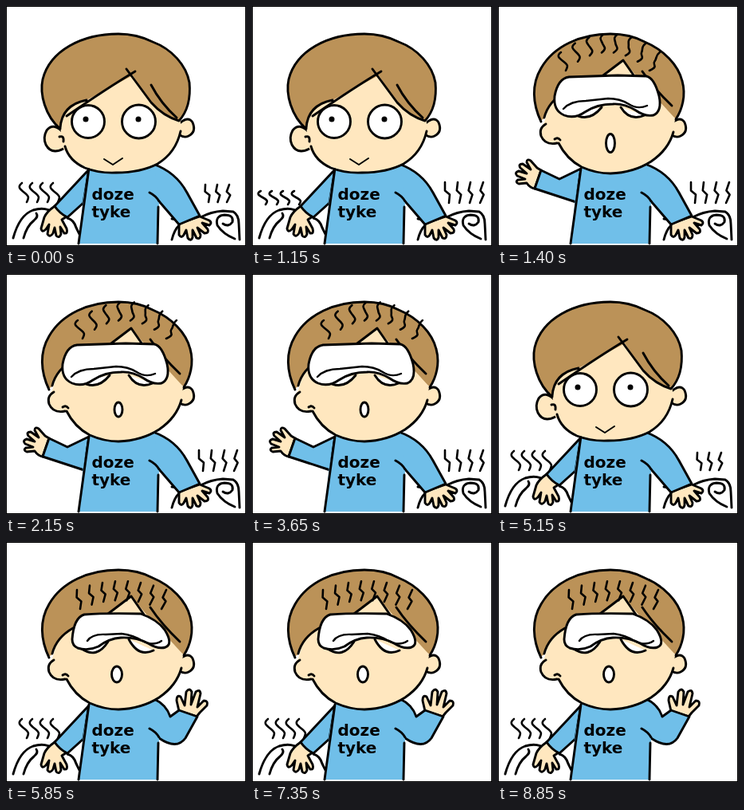
These frames come from a looping animation (301 by 301 pixels, 9.6 s). An HTML page:

```html
<!DOCTYPE html>
<html lang="en">
<head>
<meta charset="utf-8">
<title>Warm compress</title>
<style>
html, body { margin: 0; width: 100%; height: 100%; overflow: hidden; background: #fff; }
svg { display: block; width: 100vw; height: 100vh; }
.ln { fill: none; stroke: #000; stroke-width: 2.9; stroke-linecap: round; stroke-linejoin: round; }
.skin { fill: #ffe7bf; }
.hair { fill: #bb9258; }
.shirt { fill: #70bfe9; }
.white { fill: #fff; }
.flat { stroke: none; }
text { font: bold 20px "DejaVu Sans", sans-serif; }
</style>
</head>
<body>
<svg viewBox="0 0 301 301" xmlns="http://www.w3.org/2000/svg">
  <rect width="301" height="301" fill="#fff"/>

  <g class="ln">
    <!-- left arm resting on the hot towel -->
    <g data-on="bare maskR">
      <path d="M9 291Q17 262 34 256Q50 251 60 260M22 291Q26 276 35 269Q41 264 38 260M77 266Q85 268 88 278L93 288"/>
      <path class="skin" d="M61 251Q51 258 48 265L44 279Q45 285 50 280L54 274L52 286Q55 291 59 285L61 278L63 288Q67 292 69 286L68 277L73 285Q78 286 76 279L70 268L76 264Z"/>
      <path class="shirt" d="M104 205L61 251Q67 260 77 265L97 247Z"/>
    </g>
    <!-- left arm raised -->
    <g data-on="maskL">
      <path class="skin" d="M54 206L49 203L41 194Q36 191 36 196L41 205L31 198Q25 198 28 203L36 210L26 207Q20 209 24 213L34 217L25 218Q21 221 26 223L36 222Q40 228 46 229Z"/>
      <path class="shirt" d="M104 204L77 217L54 206L46 229L98 246Z"/>
    </g>
    <!-- right arm resting -->
    <g data-on="bare maskL">
      <path d="M208 293Q211 281 217 275M208 267L218 268M244 265Q257 258 272 257L285 258Q292 262 292 273L293 293"/>
      <path d="M287 292Q272 286 265 275Q262 263 274 262Q286 262 284 271Q279 278 272 273"/>
      <path class="skin" d="M217 273L217 287Q220 292 223 287L226 281L228 291Q232 296 234 290L234 281L239 291Q244 293 244 287L240 278L249 285Q255 285 253 280L246 272L255 275Q259 272 255 269L243 264Z"/>
      <path class="shirt flat" d="M183 198Q213 208 227 234L243 263L217 274L190 243Z"/>
      <path d="M184 198Q213 208 227 234L243 263L217 274L192 245"/>
    </g>
    <!-- right arm raised -->
    <g data-on="maskR">
      <path class="skin" d="M217 212L214 199Q214 191 219 194L224 205L226 188Q230 182 233 188L232 204L238 188Q243 184 244 190L240 207L248 199Q254 199 252 205L243 214L239 219Z"/>
      <path class="shirt flat" d="M183 197Q200 203 206 219L217 211L240 219L225 246Q214 261 191 246Z"/>
      <path d="M186 197Q201 204 206 219L217 211L240 219L225 246Q214 261 192 246"/>
    </g>

    <path class="shirt flat" d="M104 203L186 197L192 246L190 298H91L97 240Z"/>
    <path d="M104 204L91 298M180 234Q188 238 192 245M191 252L190 298"/>
  </g>
  <text x="107.500" y="243">doze</text>
  <text x="107.500" y="265">tyke</text>

  <g class="ln">
    <path class="skin" d="M219 146Q229 138 234 146Q239 158 229 163Q223 166 217 161"/>

    <g data-on="bare">
      <path class="skin" d="M70 157Q59 146 51 156Q46 165 50 174Q57 187 72 179"/>
      <path class="skin flat" d="M68 152Q72 104 120 86Q160 70 195 100Q220 120 219 152Q216 183 187 200Q163 210 137 210Q91 207 72 179Z"/>
      <path d="M74 176Q79 194 99 203Q117 210 138 209Q169 209 190 198Q213 184 219 157"/>
      <path class="hair flat" d="M68 154C49 138 42 110 46 92C55 56 95 35 141 35C158 35 172 39 184 45C208 54 226 74 230 96C232 118 226 134 217 144Q193 136 178 116L159 87L101 118Q70 128 68 154Z"/>
      <path d="M68 154C49 138 42 110 46 92C55 56 95 35 141 35C158 35 172 39 184 45C208 54 226 74 230 96C232 118 226 134 217 144Q197 138 182 121L151 79"/>
      <path d="M162 82Q130 101 76 138M101 118Q70 124 68 153M182 99Q194 122 214 140M67 164Q73 162 72 170"/>
      <circle class="white" cx="103" cy="145" r="20.500"/>
      <circle class="white" cx="166.500" cy="145" r="21"/>
      <path d="M123 192L134 199L146 191" stroke-width="2"/>
    </g>

    <g data-on="maskL maskR">
      <path class="skin flat" d="M58 146L70 105L130 65H180L222 142L220 158Q214 180 192 195Q170 209 141 210Q123 210 105 202Q86 192 76 172Q60 177 54 163Q52 152 58 146Z"/>
      <path d="M60 148Q51 153 54 163Q59 175 74 172M71 167Q75 164 78 168M76 172Q86 192 105 202Q123 210 141 210Q170 209 192 195Q214 180 220 158"/>
      <path class="hair flat" d="M53 144C43 122 42 98 54 78C70 50 104 35 141 35C158 35 173 39 184 45C208 55 226 74 231 94C236 112 231 130 223 142L201 118L178 93L157 68L128 90L84 108Q64 118 58 141Z"/>
      <path d="M54 145C43 122 42 98 54 78C70 50 104 35 141 35C158 35 173 39 184 45C208 55 226 74 231 94C236 112 231 130 223 142"/>
      <path d="M128 90L157 68L173 91M181 82Q195 103 218 125M58 140Q63 120 84 108"/>
    </g>
    <g data-on="maskL">
      <path class="white" d="M94 135Q114 147 130 127M154 127Q165 145 184 137"/>
      <path class="white" d="M71 113Q75 91 89 89L150 87L186 88Q196 90 202 113Q206 132 195 137Q184 139 173 131Q158 122 144 123Q124 123 109 133Q96 142 83 137Q69 131 71 113Z"/>
      <path d="M82 129Q91 119 110 119L138 116Q153 116 164 123Q175 130 187 125" stroke-width="2.400"/>
    </g>
    <g data-on="maskR">
      <path class="white" d="M95 134Q114 147 128 125M154 122Q166 145 185 136"/>
      <path class="white" d="M83 122Q85 95 98 91Q125 89 169 90Q189 97 199 110Q210 128 200 132Q191 135 178 127Q163 119 144 120Q129 121 116 131Q103 137 90 133Q83 130 83 122Z"/>
      <path d="M102 124Q108 115 125 116L145 115Q160 117 171 124Q185 131 195 124" stroke-width="2.400"/>
    </g>
    <ellipse id="mouth" class="white"/>
    <path id="steam" stroke-width="2.600"/>
  </g>
  <g data-on="bare">
    <circle cx="100" cy="142" r="3.500"/>
    <circle cx="166" cy="142" r="3.500"/>
  </g>
  <rect x=".5" y=".5" width="300" height="300" fill="none" stroke="#000"/>
</svg>
<script>
const LOOP = 9600;
const start = performance.now();
const mouth = document.getElementById('mouth');
const steam = document.getElementById('steam');
const parts = [...document.querySelectorAll('[data-on]')];

// One wisp from the top down, sheared by lean: soft curves or sharp corners.
const wisp = (x, y, h, lean) =>
  `M${x} ${y}c-6 ${h * .2} -3 ${h * .3} ${lean * .5} ${h * .5}s6 ${h * .25} ${lean * .5} ${h * .5}`;
const zig = (x, y, h, lean) =>
  `M${x} ${y}l${lean * .4 - 2} ${h * .4} ${lean * .2 + 5} ${h * .2} ${lean * .4 - 3} ${h * .4}`;

// A row of n wisps on an arc, leaning from one angle to another.
const fan = (n, shape, x, dx, y, h, rise = 0, from = 6, to = from) =>
  Array.from({ length: n }, (_, i) => {
    const p = i / (n - 1);
    return shape(x + i * dx, y - rise * 4 * p * (1 - p), h, from + (to - from) * p);
  }).join('');

const leftSteam = fan(4, wisp, 20, 13, 222, 24);
const rightSteam = fan(4, zig, 242, 16, 221, 26, 0, 5, -4);
const calm = leftSteam + fan(3, zig, 250, 15, 224, 22, 0, 4, -3);
const stirred = fan(4, wisp, 11, 14, 232, 17) + rightSteam;
const waves = x => rightSteam + fan(8, wisp, x, 17.7, 58, 23, 23, 6, -13);
const zigs = x => leftSteam + fan(8, zig, x, 16, 60, 24, 11, 4, -6);

const scenes = {
  calm: ['bare', calm],
  stirred: ['bare', stirred],
  leftA: ['maskL', waves(79), 141, 172, 5.5, 11.5],
  leftB: ['maskL', waves(90), 141, 170, 5, 9],
  rightA: ['maskR', zigs(89), 139, 166, 6.5, 10],
  rightB: ['maskR', zigs(98), 139, 168, 7, 12]
};
const cues = [
  [0, 'calm'], [450, 'stirred'], [700, 'calm'], [1150, 'stirred'],
  [1400, 'leftA'], [2150, 'leftB'], [2900, 'leftA'], [3650, 'leftB'], [4400, 'leftA'],
  [5150, 'calm'], [5600, 'stirred'],
  [5850, 'rightA'], [6600, 'rightB'], [7350, 'rightA'], [8100, 'rightB'], [8850, 'rightA']
];

let shown;
function draw(t) {
  const name = cues.findLast(c => c[0] <= t)[1];
  if (name === shown) return;
  shown = name;
  const [pose, path, cx, cy, rx, ry] = scenes[name];
  for (const p of parts)
    p.style.display = p.dataset.on.split(' ').includes(pose) ? '' : 'none';
  steam.setAttribute('d', path);
  mouth.style.display = rx ? '' : 'none';
  if (rx) Object.entries({ cx, cy, rx, ry }).forEach(([k, v]) => mouth.setAttribute(k, v));
}

function tick() {
  draw((performance.now() - start) % LOOP);
  requestAnimationFrame(tick);
}
tick();
</script>
</body>
</html>
```
